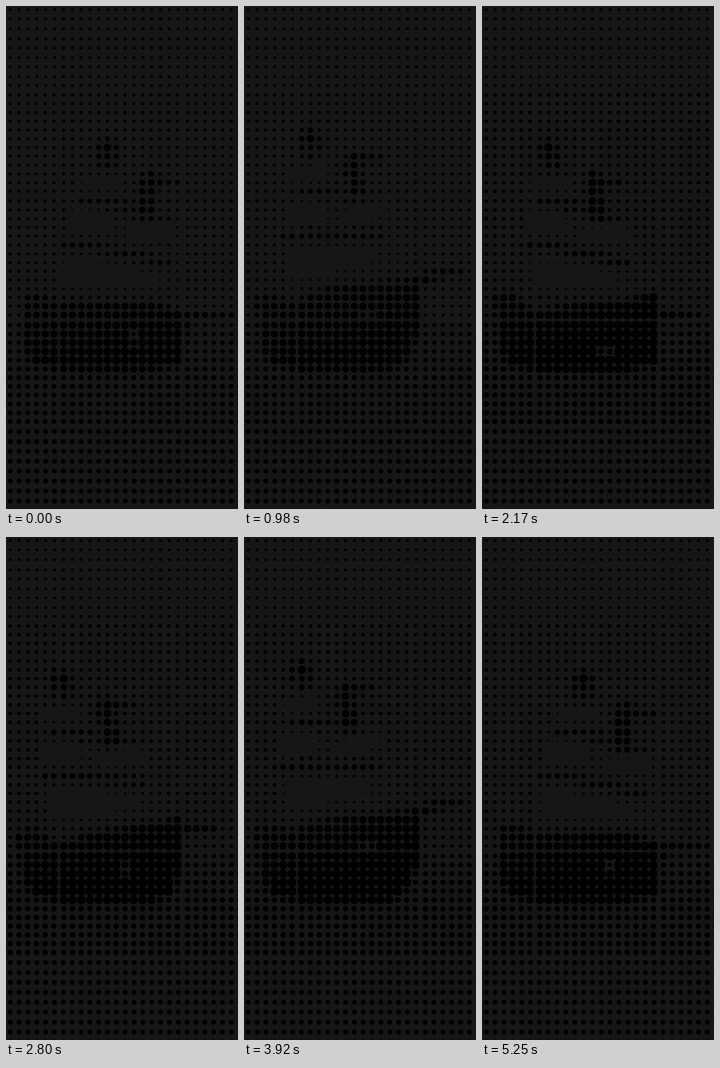
These frames come from a looping animation (509 by 1101 pixels, 5.32 s). An HTML page without scripts:

```html
<!DOCTYPE html>
<html lang="en">
<head>
<meta charset="utf-8">
<title>Halftone figure</title>
<style>
html, body { margin: 0; height: 100%; overflow: hidden; background: #161616; }
svg { display: block; width: 100vw; height: 100vh; }
.gain, .head, .jaw, .body, .arm, .notch { animation: 5320ms linear infinite; }
.gain { animation-name: gain; }
.head { animation-name: head; transform-origin: 200px 560px; }
.jaw { animation-name: jaw; }
.body { animation-name: body; }
.arm { animation-name: arm; }
.notch { animation-name: notch; }
.line { fill: none; stroke-linejoin: round; }

@keyframes gain {
  0%, 25% { opacity: .9; }
  40%, 100% { opacity: 1; }
}
@keyframes head {
  0%, 98.68%, 100% { transform: translate(0px, 0px) skew(0deg, 0deg) scaleX(1); }
  18.42% { transform: translate(-38px, -20px) skew(9.5deg, -12deg) scaleX(.95); }
  40.79% { transform: translate(-28px, 1px) skew(10.5deg, 0deg) scaleX(.94); }
  63.16% { transform: translate(-57px, -1px) skew(16deg, -14deg) scaleX(.92); }
  73.68% { transform: translate(-48px, -20px) skew(11.5deg, -12deg) scaleX(.93); }
  80.26% { transform: translate(-28px, -28px) skew(6deg, -6deg) scaleX(.96); }
  88.16% { transform: translate(0px, -18px) skew(.5deg, 0deg) scaleX(1); }
}
@keyframes jaw {
  0%, 40.79%, 88.16%, 100% { transform: translateY(0); }
  18.42%, 63.16%, 73.68% { transform: translateY(-11px); }
}
@keyframes body {
  0%, 98.68%, 100% { d: path("M36 640L60 628 110 642 200 645 300 648 394 668V715L386 782 320 798 120 798 55 783 38 740Z"); }
  18.42% { d: path("M22 638L60 635 110 646 200 612 300 603 388 597V705L350 782 320 798 120 798 55 783 38 740Z"); }
  40.79% { d: path("M24 638L60 620 110 668 200 653 300 651 388 624V705L384 782 320 798 120 798 55 783 38 740Z"); }
  63.16% { d: path("M16 653L60 648 115 676 200 635 300 615 388 604V705L350 782 320 798 120 798 55 783 38 740Z"); }
  73.68% { d: path("M20 638L60 636 110 640 200 615 300 606 388 596V705L350 782 320 798 120 798 55 783 38 740Z"); }
  88.16% { d: path("M36 623L60 613 110 630 200 635 300 640 394 652V710L386 782 320 798 120 798 55 783 38 740Z"); }
}
@keyframes arm {
  0%, 98.68%, 100% { d: path("M386 700L408 680 502 676"); }
  18.42% { d: path("M375 605L412 590 480 578"); }
  40.79% { d: path("M375 680L417 677 480 676"); }
  63.16% { d: path("M375 618L412 602 460 597"); }
  73.68% { d: path("M375 605L412 590 480 579"); }
  88.16% { d: path("M386 697L408 665 502 657"); }
}
@keyframes notch {
  0%, 88.16%, 98.68%, 100% { transform: translate(280px, 723px); }
  18.42%, 73.68% { transform: translate(271px, 677px); }
  40.79% { transform: translate(271px, 757px); }
  63.16% { transform: translate(261px, 702px); }
}
</style>
</head>
<body>
<svg viewBox="0 0 509 1101" preserveAspectRatio="none">
  <defs>
    <!-- Brightness in the scene stands for dot radius: 255 = 13.6px -->
    <radialGradient id="cone" gradientUnits="userSpaceOnUse" cx="9.585" cy="9.585" r="13.6">
      <stop stop-color="#fff"/><stop offset="1"/>
    </radialGradient>
    <pattern id="cell" width="19.17" height="19.17" patternUnits="userSpaceOnUse">
      <rect width="19.17" height="19.17" fill="url(#cone)"/>
    </pattern>
    <g id="band" fill="url(#cell)">
      <rect width="115" height="268.4" transform="translate(-.4)"/>
      <rect width="268.4" height="268.4" transform="translate(117.2)"/>
      <rect width="134.2" height="268.4" transform="translate(388.7)"/>
    </g>
    <path id="row" d="M9.4 0h506" fill="none" stroke="#000"
      stroke-linecap="round" stroke-dasharray="0 19.4"/>

    <!-- Columns and rows where the scene is sampled -->
    <mask id="cols" maskUnits="userSpaceOnUse" x="-10" y="0" width="545" height="1101">
      <path d="M8.2 550h100M125.8 550h252M397.3 550h118" fill="none" stroke="#fff"
        stroke-width="1101" stroke-dasharray="2 17.17"/>
    </mask>
    <mask id="rows" maskUnits="userSpaceOnUse" x="-10" y="0" width="545" height="1101">
      <path d="M260 193.8v214M260 426.3v252M260 697.5v214" fill="none" stroke="#fff"
        stroke-width="545" stroke-dasharray="2 17.17"/>
    </mask>

    <filter id="spread" filterUnits="userSpaceOnUse" x="-10" y="0" width="545" height="1101" color-interpolation-filters="sRGB">
      <feMorphology operator="dilate" radius="9"/>
    </filter>
    <filter id="soft" filterUnits="userSpaceOnUse" x="-10" y="0" width="545" height="1101" color-interpolation-filters="sRGB">
      <feGaussianBlur stdDeviation="5"/>
    </filter>
    <filter id="dots" filterUnits="userSpaceOnUse" x="0" y="0" width="509" height="1101" color-interpolation-filters="sRGB">
      <feColorMatrix values="0 0 0 0 0  0 0 0 0 0  0 0 0 0 0  27 0 0 0 -13.2"/>
    </filter>

    <linearGradient id="back" gradientUnits="userSpaceOnUse" x1="0" y1="688" x2="0" y2="808">
      <stop stop-color="#525252"/>
      <stop offset=".06" stop-color="#666"/>
      <stop offset=".25" stop-color="#6d6d6d"/>
      <stop offset="1" stop-color="#767676"/>
    </linearGradient>
    <linearGradient id="coat" gradientUnits="userSpaceOnUse" x1="120" y1="645" x2="155" y2="755">
      <stop stop-color="#9c9c9c"/><stop offset="1" stop-color="#c4c4c4"/>
    </linearGradient>
    <linearGradient id="sleeve" gradientUnits="userSpaceOnUse" x1="390" y1="0" x2="480" y2="0">
      <stop stop-color="#a4a4a4"/><stop offset="1" stop-color="#828282"/>
    </linearGradient>
  </defs>

  <rect width="509" height="1101" fill="#161616"/>

  <g stroke-width="6.6">
    <use href="#row" y="8"/><use href="#row" y="28"/><use href="#row" y="49.5"/>
    <use href="#row" y="72"/><use href="#row" y="92"/><use href="#row" y="113"/>
    <use href="#row" y="133"/><use href="#row" y="154.5"/><use href="#row" y="174"/>
  </g>
  <g stroke-width="11">
    <use href="#row" y="931.5"/><use href="#row" y="953.3"/><use href="#row" y="975"/>
    <use href="#row" y="996.5"/><use href="#row" y="1018.3"/><use href="#row" y="1040"/>
    <use href="#row" y="1062"/><use href="#row" y="1083.5"/><use href="#row" y="1105"/>
  </g>

  <g filter="url(#dots)">
    <rect width="509" height="1101"/>
    <g filter="url(#spread)"><g mask="url(#cols)"><g mask="url(#rows)"><g class="gain">
      <rect x="-10" width="545" height="1101" fill="url(#back)"/>
      <g filter="url(#soft)">
        <g class="head">
          <path d="M152 375H262L275 472 382 478 385 628H118V500L140 470Z" fill="#3f3f3f"/>
          <path class="line" d="M168 385H250" stroke="#000" stroke-width="22"/>
          <path d="M142 447L205 451 234 468 228 489H142Z"/>
          <path d="M258 489L338 482 371 486 370 510 270 513Z"/>
          <ellipse cx="222" cy="325" rx="27" ry="37" fill="#808080"/>
          <circle cx="224" cy="313" r="13" fill="#b4b4b4"/>
          <path class="line" d="M160 428L204 426 275 432" stroke="#777" stroke-width="19"/>
          <path class="line" d="M223 446L285 448M280 463L360 466" stroke="#6b6b6b" stroke-width="18"/>
          <path class="line" d="M318 383L380 387" stroke="#808080" stroke-width="20"/>
          <path class="line" d="M322 366L309 400 309 438 302 464" stroke="#a2a2a2" stroke-width="36"/>
          <g class="jaw">
            <path d="M128 561L188 561 268 577 318 590 328 613 130 613Z"/>
            <path class="line" d="M120 526L185 524 215 532 300 550 362 560" stroke="#7c7c7c" stroke-width="24"/>
          </g>
        </g>
        <path class="arm line" stroke="url(#sleeve)" stroke-width="22" d="M386 700L408 680 502 676"/>
        <path class="body" fill="url(#coat)" d="M36 640L60 628 110 642 200 645 300 648 394 668V715L386 782 320 798 120 798 55 783 38 740Z"/>
        <circle class="notch" r="12" fill="#5e5e5e"/>
      </g>
    </g></g></g></g>
    <g opacity=".5">
      <rect width="509" height="1101"/>
      <use href="#band" y="185.2"/>
      <use href="#band" y="417.7"/>
      <use href="#band" y="688.9"/>
    </g>
  </g>
</svg>
</body>
</html>
```
